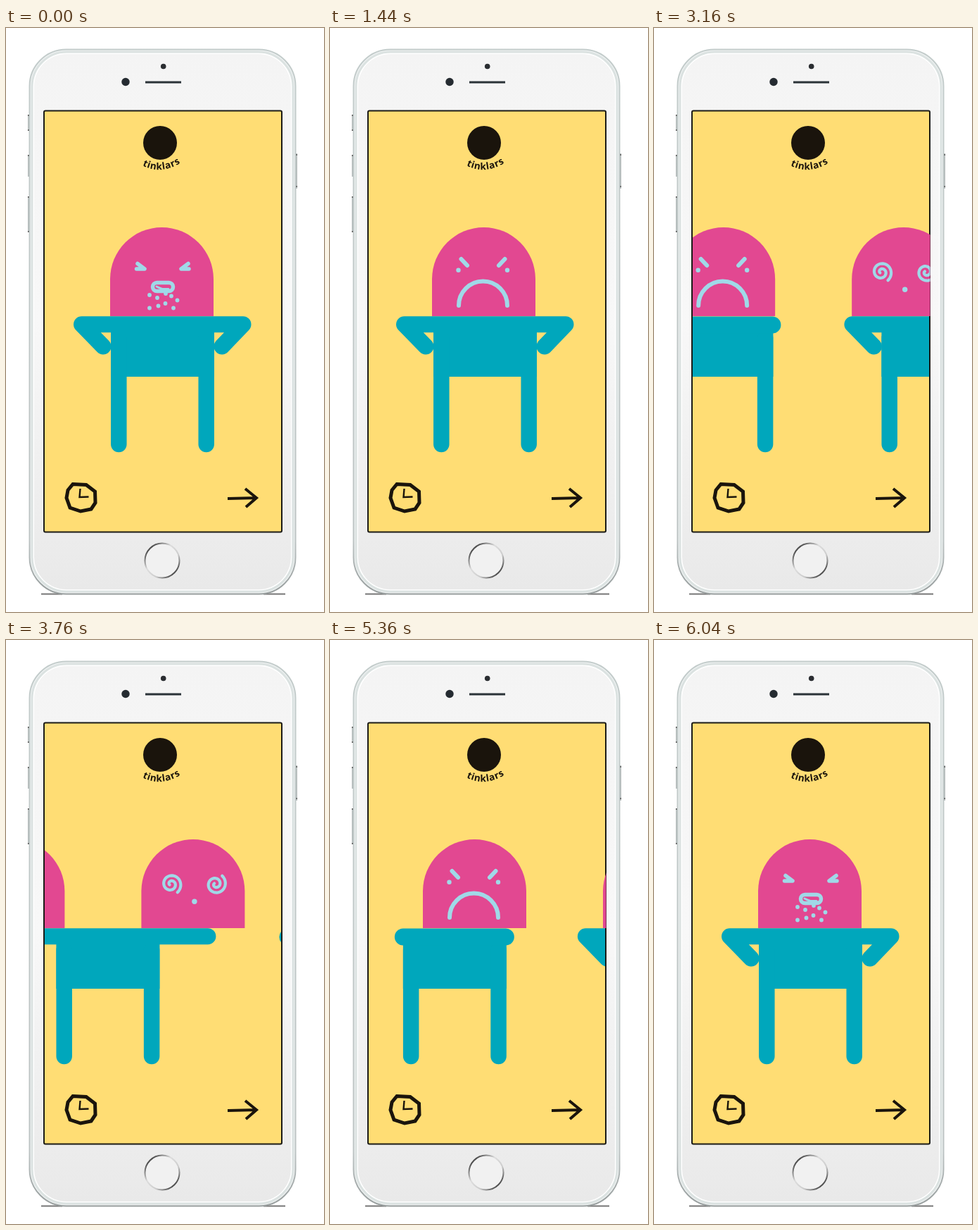
Animation of 452 by 829 pixels, one loop 6680 ms. Source, as an HTML page:

```html
<!DOCTYPE html>
<html lang="en">
<head>
<meta charset="utf-8">
<title>Character mixer</title>
<style>
  html, body { margin: 0; width: 100%; height: 100%; overflow: hidden; background: #fff; }
  svg { display: block; width: 452px; height: 829px; }
  .line { fill: none; stroke-linecap: round; stroke-linejoin: round; }
  .ink { fill: none; stroke: #1a140c; }
  .pale { stroke: #a0d9e8; }
  .dots { fill: #a0d9e8; stroke: none; }
  .teal { stroke: #00a7bc; }
</style>
</head>
<body>
<svg viewBox="0 0 452 829">
  <defs>
    <linearGradient id="shell" x2="0" y2="1">
      <stop offset="0" stop-color="#f4f4f4"/>
      <stop offset=".5" stop-color="#f8f8f8"/>
      <stop offset="1" stop-color="#e9e9e9"/>
    </linearGradient>
    <linearGradient id="edge" x2="0" y2="1">
      <stop offset="0" stop-color="#c3cccb"/>
      <stop offset=".9" stop-color="#bcc3c3"/>
      <stop offset="1" stop-color="#989e9e"/>
    </linearGradient>
    <linearGradient id="ring" x2="1" y2="1">
      <stop offset=".1" stop-color="#333"/>
      <stop offset=".4" stop-color="#ddd"/>
      <stop offset=".65" stop-color="#ccc"/>
      <stop offset=".9" stop-color="#333"/>
    </linearGradient>
    <clipPath id="headClip"><rect x="55" y="118" width="337.5" height="597"/></clipPath>
    <clipPath id="bodyClip"><rect x="55" y="118" width="336" height="597"/></clipPath>
    <path id="arc" d="M190 193Q220 211 252 189"/>

    <!-- Shared parts, with the left edge at x = 0 -->
    <path id="skull" fill="#e24891" d="M0 409V356.5a73.5 73.5 0 0 1 147 0V409z"/>
    <g id="trunk">
      <path fill="#00a7bc" d="M0 420H147V495H0z"/>
      <path class="line teal" stroke-width="22.5" d="M11.3 440V591M135.7 440V591"/>
    </g>
  </defs>

  <!-- Phone -->
  <g stroke="#b4bbbb" stroke-width="2">
    <path d="M32 123V146M32 180V211M32 241V290M413 178V228"/>
    <path stroke="#555" d="M31 124h2M31 145h2M31 181h2M31 240h2M31 289h2M412 180h2M412 225h2"/>
  </g>
  <path d="M50 803.5H80M366 803.5H397" stroke="#777" stroke-width="2"/>
  <rect x="33.5" y="30.5" width="378" height="773" rx="52" fill="#f1f4f4" stroke="url(#edge)" stroke-width="2"/>
  <rect x="37" y="34" width="371" height="766" rx="49" fill="#fff" stroke="#dbe2e1" stroke-width="3"/>
  <rect x="40" y="37" width="365" height="760" rx="46" fill="url(#shell)"/>
  <circle cx="170" cy="76.5" r="5.7" fill="#252b31"/>
  <circle cx="223.7" cy="54.5" r="3.8" fill="#2a2d31"/>
  <path d="M198 77H249" stroke="#2b3338" stroke-width="3"/>
  <circle cx="222" cy="756" r="24.5" fill="#f1f1f1" stroke="url(#ring)" stroke-width="2"/>
  <rect x="54" y="117.5" width="338" height="598" rx="2" fill="#ffdd74" stroke="#1b1b17" stroke-width="2"/>

  <!-- Header and buttons -->
  <circle cx="219" cy="163" r="24" fill="#1a140c"/>
  <text font-family="'Open Sans', sans-serif" font-size="13.5" font-weight="700" letter-spacing=".6" fill="#1a140c" text-anchor="middle">
    <textPath href="#arc" startOffset="50%">tinklars</textPath>
  </text>
  <g class="ink" stroke-width="4">
    <path stroke-width="5" d="M95 647.5L114 648.5L126.5 658L127 674L121 683L106 686L91 681L86 667L88 656z"/>
    <path stroke-width="2.4" d="M105.500 654L104.500 666L117.500 665.500"/>
    <path d="M315 668L356 667M340 654L356 667L341 680"/>
  </g>

  <g clip-path="url(#bodyClip)"><g id="bodies">
    <g>
      <use href="#trunk"/>
      <path class="line teal" stroke-width="23" d="M-68.5 420.7H215.5"/>
    </g>
    <g transform="translate(329)">
      <use href="#trunk"/>
      <path class="line teal" stroke-width="24" d="M0 421.5H146"/>
    </g>
    <g transform="translate(630)">
      <use href="#trunk"/>
      <path class="line teal" stroke-width="23" d="M-11 452L-41.5 420.7H188L158 452"/>
    </g>
  </g></g>

  <g clip-path="url(#headClip)"><g id="heads">
    <g>
      <use href="#skull"/>
      <g class="line pale" stroke-width="5.5">
        <path d="M39 334.5L49 342H37.5M111 334.5L101 342H112"/>
        <rect x="60.5" y="361.5" width="29" height="12" rx="6"/>
        <path stroke-width="3" d="M66 367Q70 369 74 370.5H83"/>
      </g>
      <g id="spray" class="dots"></g>
    </g>
    <g transform="translate(256)">
      <use href="#skull"/>
      <path class="line pale" stroke-width="6" d="M41.5 328L50 337M103.5 328L95 337M38 394A34.5 34.5 0 0 1 107 394"/>
      <g class="dots"><circle cx="37.5" cy="343.7" r="3.2"/><circle cx="107" cy="343.7" r="3.2"/></g>
    </g>
    <g transform="translate(512)">
      <use href="#skull"/>
      <g class="line pale" stroke-width="4.2">
        <path id="swirl" transform="translate(42 346.5)"/>
        <use href="#swirl" transform="translate(63.5 693) scale(1 -1)"/>
      </g>
      <circle class="dots" cx="75.5" cy="371.3" r="3.7"/>
    </g>
  </g></g>
</svg>
<script>
const LOOP = 6680, STEP = 40;
const $ = id => document.getElementById(id);

// Linear tracks of [time, x]
const headTrack = [[0, 148], [1360, -111], [2350, -111], [4060, -364], [4760, -364], [6040, 148], [LOOP, 148]];
const bodyTrack = [[0, -481], [1440, -483], [2880, -483], [3880, 147], [4720, 147], [5800, -481], [LOOP, -481]];

function at(track, t) {
  const i = track.findIndex(key => key[0] > t);
  const [t0, x0] = track[i - 1], [t1, x1] = track[i];
  return x0 + (x1 - x0) * (t - t0) / (t1 - t0);
}

$('spray').innerHTML = [[56, 379], [67, 383], [79, 377], [87, 380.5], [95.5, 386.5], [56, 397.5], [68.5, 394.5], [78.5, 391], [90, 397.5]]
  .map(([x, y]) => `<circle cx="${x}" cy="${y}" r="2.9"/>`).join('');

// Spiral winding inwards from the lower right
const swirl = Array.from({ length: 61 }, (_, i) => {
  const turn = i / 60 * 10.8, r = 15 - turn * 1.2, a = 0.9 - turn;
  return `${(r * Math.cos(a)).toFixed(2)} ${(r * Math.sin(a)).toFixed(2)}`;
});
$('swirl').setAttribute('d', 'M' + swirl.join('L'));

const slide = (id, x) => $(id).setAttribute('transform', `translate(${x.toFixed(2)})`);

function draw() {
  const t = Math.floor(performance.now() % LOOP / STEP) * STEP;
  slide('heads', at(headTrack, t));
  slide('bodies', at(bodyTrack, t));
  requestAnimationFrame(draw);
}
draw();
</script>
</body>
</html>
```
